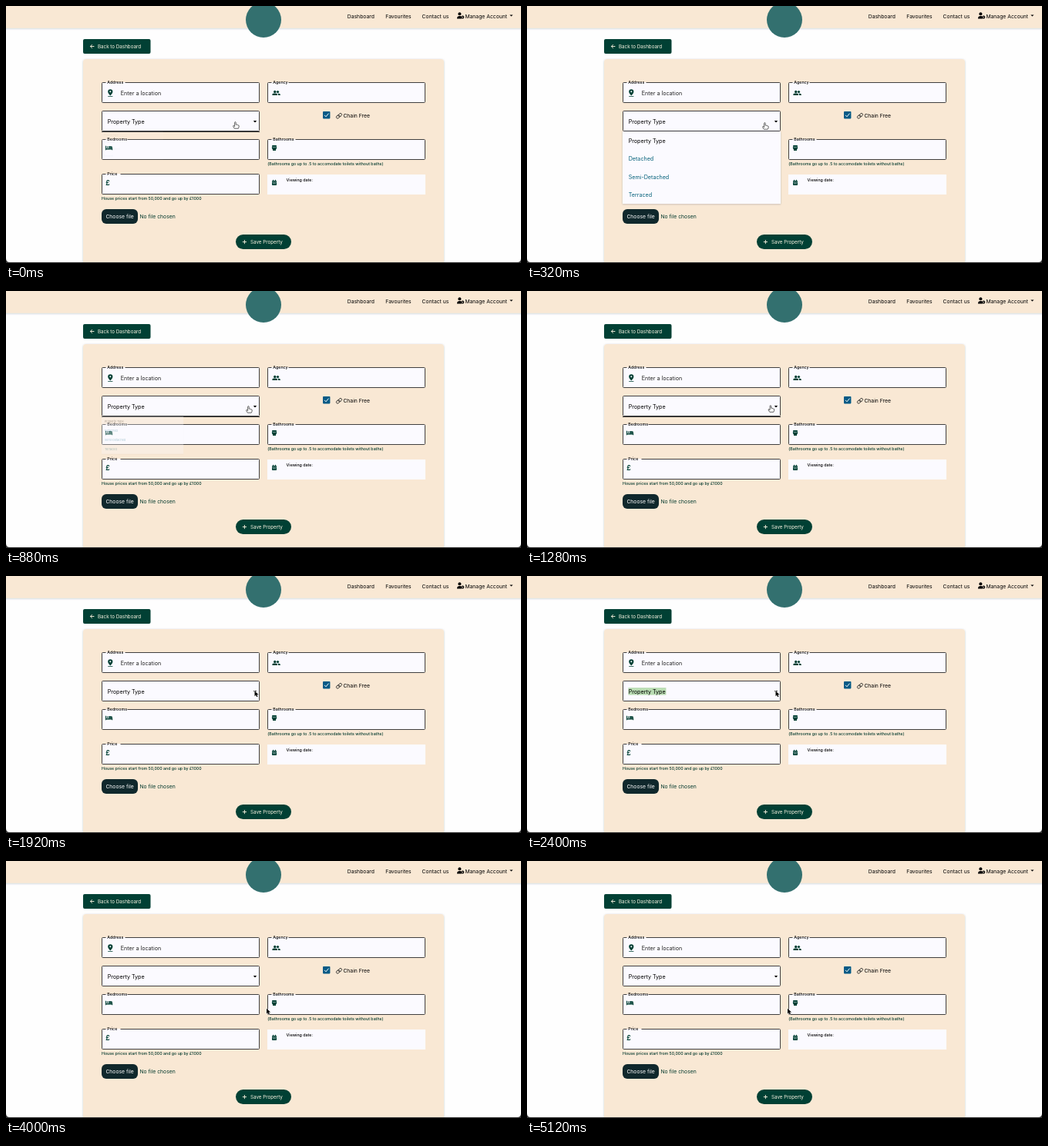
An HTML page for the animation above (5.2 s loop, 668 by 334 pixels).

```html
<!DOCTYPE html>
<html lang="en">
<head>
<meta charset="utf-8">
<title>Property form</title>
<style>
  html, body { margin: 0; width: 100%; height: 100%; overflow: hidden; background: #fefefe; }
  svg { display: block; font: 6.8px Inter, sans-serif; fill: #000; }
  .panel { fill: #f9e8d4; }
  .box { fill: #fbfaff; stroke: #2c2c2c; stroke-width: .9; }
  .plain { fill: #fbfaff; }
  .green { fill: #014034; }
  .line { fill: none; stroke: #014034; stroke-width: 1; }
  .small { font-size: 5.3px; font-weight: 500; }
  .hint { font-size: 5.25px; font-weight: 500; fill: #01382c; }
  .field { font-size: 7.15px; }
  .btn { font-size: 6.25px; fill: #fff6e4; }
  .opt { fill: #04607a; }
  .plus { fill: none; stroke: #fff6e4; stroke-width: .9; }
  .cursor { fill: #fff; stroke: #222; stroke-width: .7; stroke-linejoin: round; }
</style>
</head>
<body>
<svg width="668" height="334" viewBox="0 0 668 334">
  <defs>
    <filter id="soft" x="-10%" y="-20%" width="120%" height="150%">
      <feDropShadow dx="0" dy=".6" stdDeviation=".8" flood-color="#234" flood-opacity=".25"/>
    </filter>
  </defs>

  <rect class="panel" x="-5" y="-5" width="678" height="33.7" filter="url(#soft)"/>
  <circle cx="334" cy="18" r="23" fill="#33706f"/>
  <text x="442.8" y="15.8">Dashboard</text>
  <text x="492.3" y="15.8">Favourites</text>
  <text x="539.6" y="15.8">Contact us</text>
  <text x="595.4" y="15.8">Manage Account</text>
  <path d="M653.3 11.4h4.2l-2.1 2.2z"/>
  <circle cx="588.4" cy="10.2" r="2"/>
  <path d="M585 16.4q0-3.4 3.4-3.4h1.6l1 3.4z"/>
  <circle cx="592.3" cy="14.5" r="1.4" fill="none" stroke="#000" stroke-width="1.2"/>

  <rect class="green" x="100" y="43" width="87.5" height="19" rx="2"/>
  <path class="plus" d="M114.4 52.5h-5m2.4-2.4l-2.4 2.4 2.4 2.4"/>
  <text class="btn" x="119" y="54.8">Back to Dashboard</text>

  <rect class="panel" x="100" y="69" width="468" height="275" rx="4" filter="url(#soft)"/>
  <g id="fields"></g>

  <path class="green" d="M135.3 116.6c-1.9-2.1-3.1-3.6-3.1-5.3a3.1 3.1 0 0 1 6.2 0c0 1.7-1.2 3.2-3.1 5.3zM132.2 117.2h6.2v.9h-6.2z"/>
  <circle cx="135.3" cy="111.2" r="1" fill="#fbfaff"/>
  <text class="field" x="148.8" y="115.8" fill="#222">Enter a location</text>

  <g class="green">
    <circle cx="348.7" cy="111.5" r="1.7"/><circle cx="352.5" cy="111.5" r="1.6"/>
    <path d="M345.4 116v-1q0-1.4 3.3-1.4t3.3 1.4v1zM353 116v-1.2l-.6-1.2q3.4 0 3.4 1.6v.8z"/>
  </g>

  <path id="focus" d="M124 163.5h205" stroke="#2c2c2c"/>
  <rect id="mark" x="131.4" y="145.2" width="49" height="9.4" fill="#b9dcb2"/>
  <text class="field" x="131.7" y="152.7">Property Type</text>
  <path d="M320.8 149h4.4l-2.2 2.4z"/>

  <rect x="411" y="137" width="9.4" height="9.4" rx=".8" fill="#045a86"/>
  <path d="M413 141.8l2 2 3.5-4.2" fill="none" stroke="#fff"/>
  <g fill="none" stroke="#222" stroke-width=".8" transform="rotate(-40 432 142.8)">
    <rect x="427.8" y="141.1" width="5" height="3.4" rx="1.7"/>
    <rect x="431.2" y="141.1" width="5" height="3.4" rx="1.7"/>
  </g>
  <text x="437.4" y="145.2">Chain Free</text>

  <path class="green" d="M129 181.8h1v3.3h8.2v2.2h-1v-.9h-7.2v.9h-1zM133.2 182.3h3.2q1.8 0 1.8 2.4h-5z"/>
  <circle class="green" cx="131.6" cy="183.6" r="1"/>
  <path class="green" d="M345.2 181h5.6v2.4h.4q0 2.3-1.2 3v1.5h-4v-1.5q-1.2-.7-1.2-3h.4z"/>
  <path d="M346 183.4h4" stroke="#fbfaff" stroke-width=".5"/>
  <text class="hint" x="339.3" y="206.7">(Bathrooms go up to .5 to accomodate toilets without baths)</text>

  <text x="129.2" y="233.4" font-size="8.6" font-weight="700" class="green">£</text>
  <text class="hint" x="124" y="251.6">House prices start from 50,000 and go up by £1000</text>

  <rect class="plain" x="339" y="219" width="205" height="26"/>
  <rect class="green" x="345" y="227" width="6" height="6" rx=".7"/>
  <path class="line" d="M346.6 225.8v2m2.8-2v2"/>
  <path d="M345.2 228.9h5.6m-4.8 1.9h4" stroke="#fbfaff" stroke-width=".5"/>
  <text class="small" x="363.6" y="228">Viewing date:</text>

  <rect x="124" y="264" width="47" height="19" rx="6" fill="#10282c"/>
  <text x="129.4" y="276" fill="#fff">Choose file</text>
  <text x="173.4" y="276" fill="#01382c">No file chosen</text>

  <rect class="green" x="298" y="297" width="72" height="19" rx="9.5"/>
  <path class="plus" d="M306.8 306.6h5.2m-2.6-2.6v5.2"/>
  <text class="btn" x="317" y="308.9">Save Property</text>

  <g id="menu">
    <rect class="plain" width="205" height="94" filter="url(#soft)"/>
    <g id="options" class="field"></g>
  </g>

  <path id="hand" class="cursor" d="M-1.7 4.2Q-4 1.2-3.2.6-2.5.2-1.4 1.6V-3.4q.1-1 .8-1t.8 1V-.8q1.1-.5 1.5.3 1-.3 1.3.5 1.2-.2 1.2 1 0 1.9-.9 3.2z"/>
  <path id="arrow" d="M0 0v6.8l1.6-1.5 1.1 2.5 1.3-.6-1.1-2.4h2.2z" stroke="#fff" paint-order="stroke"/>
  <path d="M0 328q0 5 5 5h658q5 0 5-5v6H0z" fill="#333"/>
</svg>

<script>
const $ = id => document.getElementById(id);

const fields = [
  ['Address', 124.5, 99.5], ['Agency', 339.5, 99.5], ['', 124.5, 136.5],
  ['Bedrooms', 124.5, 173.5], ['Bathrooms', 339.5, 173.5],
  ['Price', 124.5, 218.5]
];
$('fields').innerHTML = fields.map(([label, x, y]) => `
  <rect class="box" x="${x}" y="${y}" width="204" height="26" rx="1"/>
  ${label && `<rect class="plain" x="${x + 5}" y="${y - .5}" width="${label.length * 3 + 4}" height="1.2"/>`}
  <text class="small" x="${x + 6.8}" y="${y + 1.8}">${label}</text>`).join('');

$('options').innerHTML = ['Property Type', 'Detached', 'Semi-Detached', 'Terraced'].map((name, i) =>
  `<text class="${i ? 'opt' : ''}" x="7.7" y="${14.6 + 23.55 * i}">${name}</text>`).join('');

const LOOP = 5200, STEP = 80, OPEN = -4, CLOSE = 828;
const progress = (t, start, length) => Math.min(1, Math.max(0, (t - start) / length));
const easeOut = (p, power) => 1 - (1 - p) ** power;

// time, x, y of the pointer
const path = [
  [0, 298, 155], [320, 309, 156], [560, 311, 156], [880, 315, 154], [1120, 315, 154],
  [1680, 322.5, 149.5], [3200, 322.5, 149.5], [3680, 338, 191.7], [LOOP, 338, 191.7]
];

function pointer(t) {
  const i = path.findIndex(k => k[0] > t);
  const [a, b] = [path[i - 1], path[i]];
  let p = progress(t, a[0], b[0] - a[0]);
  p = p * p * (3 - 2 * p);
  return [a[1] + (b[1] - a[1]) * p, a[2] + (b[2] - a[2]) * p];
}

const show = (id, on) => $(id).style.display = on ? '' : 'none';

function draw(t) {
  const opening = progress(t, OPEN, 150);
  const closing = easeOut(progress(t, CLOSE, 250), 5);
  const scale = t < CLOSE ? .3 + .7 * easeOut(opening, 5) : 1 - .7 * closing;
  $('menu').setAttribute('transform', `translate(124 163) scale(${scale})`);
  $('menu').setAttribute('opacity', t < CLOSE ? easeOut(opening, 2) : 1 - closing);
  show('menu', closing < 1);

  show('focus', t < 1680);
  show('mark', t >= 2320 && t < 3360);

  const isHand = t < 1440;
  show('hand', isHand);
  show('arrow', !isHand);
  $(isHand ? 'hand' : 'arrow').setAttribute('transform', `translate(${pointer(t)})`);
}

const begin = performance.now();
function tick() {
  const t = (performance.now() - begin) % LOOP;
  draw(Math.floor(t / STEP) * STEP);
  requestAnimationFrame(tick);
}
tick();
</script>
</body>
</html>
```
